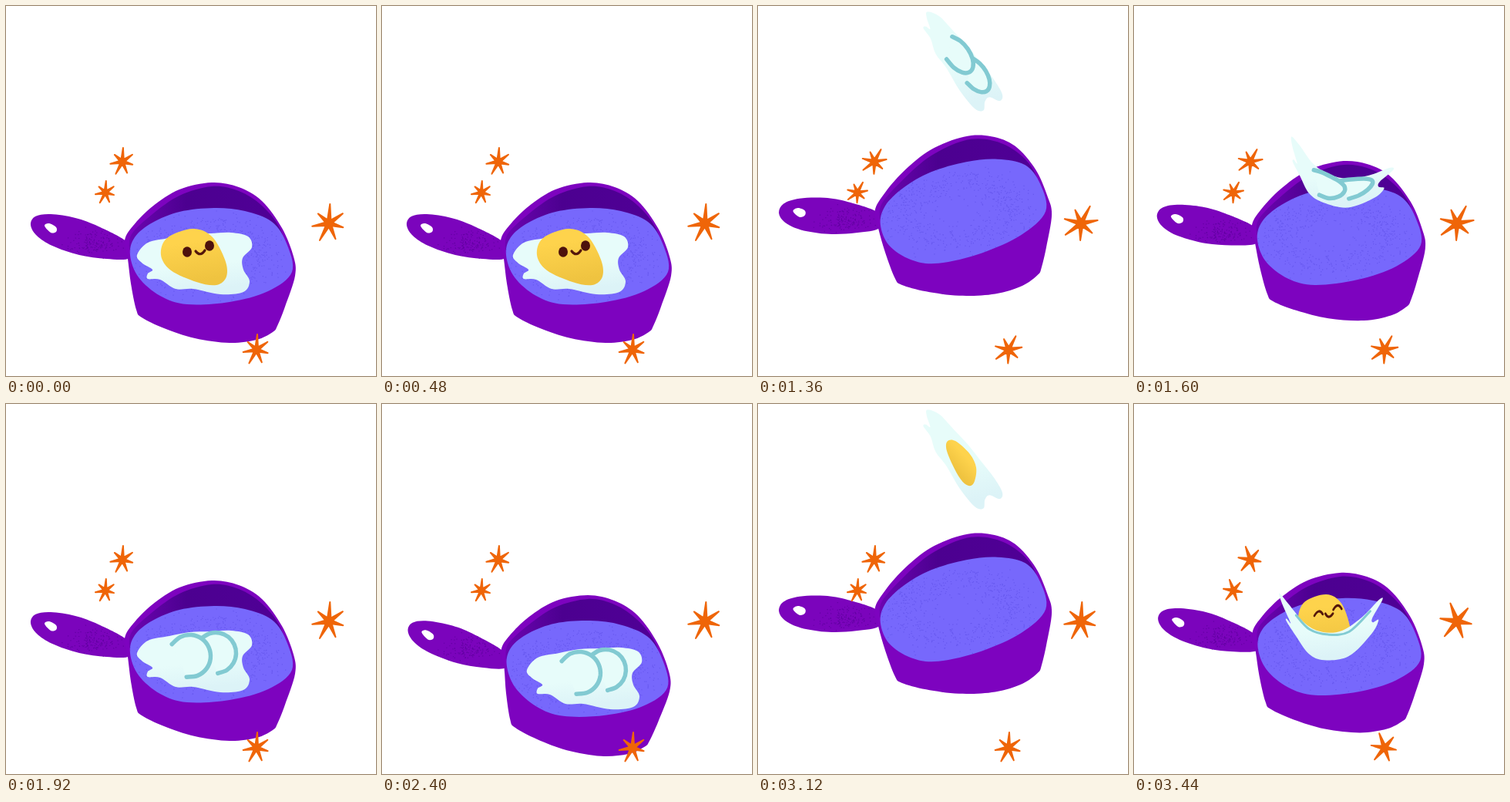
Animation, 480 px wide and 480 px high, one loop 3.52 s. Source, as an HTML page:

```html
<!DOCTYPE html>
<html lang="en">
<head>
<meta charset="utf-8">
<title>Egg flip</title>
<style>
html, body { margin: 0; width: 100%; height: 100%; overflow: hidden; background: #fff; }
svg { display: block; width: 100vw; height: 100vh; }
</style>
</head>
<body>
<svg viewBox="0 0 480 480">
  <defs>
    <linearGradient id="whiteFill" x1="0" y1="0" x2="0.2" y2="1">
      <stop offset="0.6" stop-color="#e7fcfa"/><stop offset="1" stop-color="#dcf3f7"/>
    </linearGradient>
    <linearGradient id="yolkFill" x1="0" y1="0" x2="0.2" y2="1">
      <stop offset="0.3" stop-color="#fed34c"/><stop offset="1" stop-color="#efc340"/>
    </linearGradient>
    <linearGradient id="wallFill">
      <stop offset="0" stop-color="#6c04b1"/><stop offset="0.35" stop-color="#4c0090"/><stop offset="1" stop-color="#500097"/>
    </linearGradient>
    <clipPath id="inPan"><path id="panClip"/></clipPath>
    <clipPath id="inHandle"><path id="handleClip"/></clipPath>
  </defs>
  <path id="handle" fill="#7b04bc"/>
  <g clip-path="url(#inHandle)"><path id="handleGrain" stroke="#6200a2" stroke-width="1.2"/></g>
  <path id="hole" fill="#fff"/>
  <path id="body" fill="#7d03bf"/>
  <path id="wall" fill="url(#wallFill)"/>
  <path id="surface" fill="#7768fc"/>
  <g clip-path="url(#inPan)"><path id="panGrain" stroke="#5c4ee6" stroke-width="1.2" opacity="0.6"/></g>
  <g id="egg">
    <path id="white" fill="url(#whiteFill)"/>
    <g id="arcs" fill="#e7fcfa" stroke="#82cad2" stroke-width="5.5" stroke-linecap="round">
      <path id="arc2"/><path id="arc1"/>
    </g>
    <g id="yolk">
      <path id="yolkShape" fill="url(#yolkFill)"/>
      <g id="face" fill="none" stroke="#54170b" stroke-width="3.2" stroke-linecap="round">
        <g id="open" stroke="none" fill="#4d120c">
          <ellipse cx="-9" cy="-7" rx="6" ry="6.7"/><ellipse cx="20" cy="-15" rx="6" ry="6.7"/>
        </g>
        <g id="shut"><path d="M-15-4Q-9-15-2-7"/><path d="M14-14Q20-25 27-16"/></g>
        <path d="M2-8Q8 0 14-9"/>
      </g>
    </g>
    <path id="lip" fill="none" stroke="#82cbd2" stroke-width="3" stroke-linecap="round"/>
  </g>
  <g id="stars" fill="#ef6508" stroke="#ef6508" stroke-width="2" stroke-linejoin="round"></g>
</svg>
<script>
const STEP = 80, HALF = 22;
const REST = 7, LOW = 11, TOSS = 13, PEAK = 17, LAND = 21;
const el = id => document.getElementById(id);
const set = (id, attrs) => { for (const k in attrs) el(id).setAttribute(k, attrs[k]); };
const show = (id, on) => set(id, { display: on ? 'inline' : 'none' });
const pts = s => s.split(',').map(p => p.split(' ').map(Number));
const mix = (a, b, f) => a + (b - a) * f;
const rad = deg => deg * Math.PI / 180;
const polar = (x, y, r, deg) => [x + r * Math.cos(rad(deg)), y + r * Math.sin(rad(deg))];
const progress = (t, from, to) => Math.max(0, Math.min(1, (t - from) / (to - from)));
const easeOut = (t, power) => 1 - (1 - t) ** power;

// Catmull-Rom spline through the points
function smooth(p, closed = true) {
  const n = p.length;
  const at = i => closed ? p[(i + n) % n] : p[Math.max(0, Math.min(n - 1, i))];
  const c = (a, b, d, k) => [0, 1].map(j => (a[j] + (b[j] - d[j]) * k).toFixed(1)).join(' ');
  let d = 'M' + p[0].map(v => v.toFixed(1)).join(' ');
  for (let i = 0; i < (closed ? n : n - 1); i++) {
    const a = at(i), b = at(i + 1);
    d += `C${c(a, b, at(i - 1), 1 / 6)} ${c(b, a, at(i + 2), 1 / 6)} ${c(b, b, b, 0)}`;
  }
  return closed ? d + 'Z' : d;
}

function arc(x, y, r, from, to, count = 9) {
  return Array.from({ length: count }, (_, i) => polar(x, y, r, mix(from, to, i / (count - 1))));
}

// Pan at rest
const BODY = pts('154 304,165 285,190 260,225 238,267 229,302 235,332 253,358 288,373 325,375 350,362 390,352 415,346 423,325 433,290 437,245 431,205 418,176 404,169 394,162 360,158 328');
const WALL = pts('160 316,163 296,190 270,225 246,267 234,302 240,332 259,356 290,371 340');
const SURFACE = pts('161 323,167 300,190 281,225 267,270 262,310 266,345 280,364 308,371 345,340 370,290 384,235 387,200 376,172 352');
const HANDLE = pts('32 284,38 273,58 270,90 275,120 286,158 307,160 327,130 328,95 323,60 311,40 298');
const HOLE = pts('50 285,56 282,65 287,65 293,58 294');

// Lifting tips the pan up to the right and pushes its foot outwards
function tip([x, y], lift, foot) {
  const slope = 0.0022 - lift * 0.000016;
  return [
    x + lift * (0.00035 * (267 - x) - 0.0026 * foot * Math.max(0, y - 325)),
    y + lift * (1 + slope * (x - 267))
  ];
}

function rimLift(step) {
  if (step <= LOW) return 38 * easeOut(progress(step, REST, LOW), 2.4);
  if (step <= TOSS) return mix(38, -69, progress(step, LOW, TOSS));
  return -69 * (1 - progress(step, TOSS, LAND + 0.5) ** 2.6);
}

function drawPan(lift) {
  const part = (p, foot = 0) => p.map(q => tip(q, lift, foot));
  const surface = smooth(part(SURFACE)), handle = smooth(part(HANDLE));
  set('body', { d: smooth(part(BODY, 1)) });
  set('wall', { d: smooth(part(WALL), false) + 'Z' });
  set('surface', { d: surface });
  set('panClip', { d: surface });
  set('handle', { d: handle });
  set('handleClip', { d: handle });
  set('hole', { d: smooth(part(HOLE)) });
  set('panGrain', { transform: `translate(0 ${lift})` });
  set('handleGrain', { transform: `translate(0 ${lift / 2})` });
}

// Egg lying flat
const WHITE = pts('170 323,184 307,212 301,238 296,265 295,292 294,314 299,319 313,307 327,308 342,316 357,308 371,278 374,243 367,220 367,200 355,184 354,184 347,190 342,176 333');
const ARC1 = arc(238, 327, 27.5, -146, 98);
const ARC2 = arc(272, 323, 26.5, -133, 84);
const LIP = pts('197 306,218 306,245 300,275 307,303 301');
const YOLK = pts('-43 -3,-35 -25,-2 -37,23 -27,40 3,42 25,29 36,3 32,-30 17');
set('yolkShape', { d: smooth(YOLK) });

const flat = { x: 245, y: 334, sx: 1, sy: 1, turn: 0, bend: 0, yolkX: 244, yolkY: 326, yolkW: 1, yolkH: 1, look: 0 };
const low = { ...flat, x: 281, y: 378, yolkX: 281.5, yolkY: 365.5, yolkW: 0.9, look: 1 };
const tossed = { ...flat, x: 277, y: 201, turn: -3, bend: 0.004, yolkX: 277, yolkY: 196 };
const edge = { ...flat, x: 260, y: 71, sy: 0.55, turn: 53, yolkX: 264, yolkY: 75, yolkW: 0.75, yolkH: 0.4 };
const cupped = { ...flat, x: 250, y: 316, sx: 0.9, sy: 0.5, turn: 5, bend: -0.013, yolkX: 248, yolkY: 284, yolkW: 0.82, look: 1 };

const between = (a, b, f) => Object.fromEntries(Object.keys(a).map(k => [k, mix(a[k], b[k], f)]));

function eggPose(step) {
  if (step <= LOW) return between(flat, low, easeOut(progress(step, REST, LOW), 2.4));
  if (step <= TOSS) return between(low, tossed, progress(step, LOW, TOSS));
  if (step <= PEAK) return between(tossed, edge, easeOut(progress(step, TOSS, PEAK), 1.4));
  return between(edge, cupped, progress(step, PEAK, LAND) ** 1.3);
}

// Squash, bend and turn about the middle of the egg
function warp([px, py], e) {
  const u = (px - flat.x) * e.sx;
  const v = (py - flat.y) * e.sy + e.bend * u * u;
  const c = Math.cos(rad(e.turn)), s = Math.sin(rad(e.turn));
  return [e.x + u * c - v * s, e.y + u * s + v * c];
}

function drawEgg(step, startsDown) {
  const e = eggPose(step);
  const yolkUp = startsDown === (step >= PEAK);
  const cup = step > PEAK + 1;
  const line = (p, closed) => smooth(p.map(q => warp(q, e)), closed);
  set('white', { d: line(WHITE, true) });
  set('arc1', { d: line(ARC1, false) });
  set('arc2', { d: line(ARC2, false) });
  set('lip', { d: line(LIP, false) });
  set('yolk', { transform: `translate(${e.yolkX} ${e.yolkY}) rotate(${e.turn}) scale(${e.yolkW} ${e.yolkH})` });
  set('face', { transform: `translate(${-3 * e.look} ${-4 * e.look})` });
  // A cupped white wraps around the front of the yolk
  el('egg').insertBefore(el('white'), el(cup && yolkUp ? 'lip' : 'arcs'));
  show('yolk', yolkUp);
  show('arcs', !yolkUp);
  show('lip', cup && yolkUp);
  show('face', Math.abs(step - PEAK) > 1);
  show('open', step < PEAK);
  show('shut', step >= PEAK);
}

// Three star drawings take turns
const LOOKS = [{ arms: 7, start: -87 }, { arms: 6, start: -110 }, { arms: 7, start: -62 }];
const STARS = [[151, 202, 18], [129, 242, 15], [419, 282, 25], [325, 446, 20]];
el('stars').innerHTML = '<path/>'.repeat(STARS.length);

function drawStars(n) {
  const { arms, start } = LOOKS[n % LOOKS.length];
  STARS.forEach(([x, y, size], i) => {
    const d = Array.from({ length: arms * 2 }, (_, j) => {
      const reach = j % 2 ? 0.2 : 0.88 + 0.12 * Math.cos(j * Math.PI / 4);
      return polar(x, y, size * reach, start + j * 180 / arms).map(v => v.toFixed(1)).join(' ');
    });
    el('stars').children[i].setAttribute('d', 'M' + d.join('L') + 'Z');
  });
}

// Seeded brush grain
let seed = 7;
const rnd = () => (seed = seed * 16807 % 2147483647) / 2147483647;
const spread = () => rnd() + rnd() + rnd() - 1.5;
const grain = (n, spot) => Array.from({ length: n }, () => {
  const [x, y] = spot();
  return `M${x.toFixed(1)} ${y.toFixed(1)}h1.2`;
}).join('');
set('panGrain', { d: grain(650, () => {
  const t = rnd() * 2 * Math.PI;
  return [258 + 72 * Math.cos(t) + 32 * spread(), 325 + 38 * Math.sin(t) + 22 * spread()];
}) });
set('handleGrain', { d: grain(160, () => [112 + 34 * spread(), 308 + 16 * spread()]) });

function draw() {
  const n = Math.floor(performance.now() / STEP) % (HALF * 2);
  const step = n % HALF;
  drawPan(rimLift(step));
  drawEgg(step, n >= HALF);
  drawStars(n);
  requestAnimationFrame(draw);
}
draw();
</script>
</body>
</html>
```
